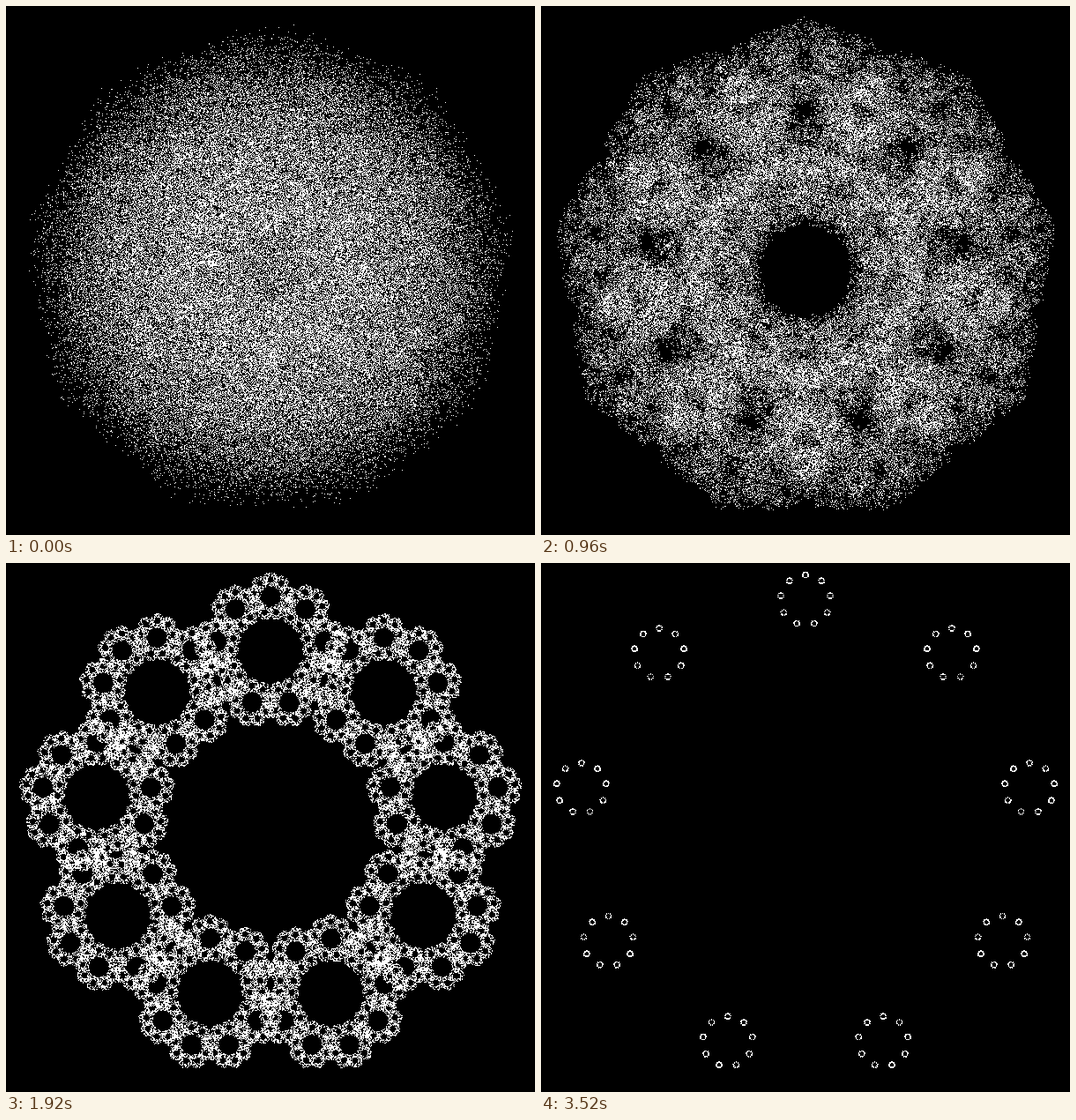
Write an HTML page with a canvas that moves like this. It is 600 px wide and 600 px high and loops after 3600 ms.

```html
<!DOCTYPE html>
<html lang="en">
<head>
<meta charset="utf-8">
<title>Chaos game on a nonagon</title>
<style>
  html, body { margin: 0; width: 100%; height: 100%; overflow: hidden; background: #000; }
  canvas { display: block; width: 600px; height: 600px; image-rendering: pixelated; }
</style>
</head>
<body>
<canvas id="stage" width="600" height="600"></canvas>
<script>
const SIZE = 600, CENTER = SIZE / 2, RADIUS = 290;
const CORNERS = 9, POINTS = 105000, WARM_UP = 30;
const STEP_MS = 80, STEPS = 45;
const BLACK = 0xff000000, WHITE = 0xffffffff;

const ctx = document.getElementById('stage').getContext('2d');
const image = ctx.createImageData(SIZE, SIZE);
const pixels = new Uint32Array(image.data.buffer);

const corners = Array.from({ length: CORNERS }, (_, i) => {
  const angle = i * 2 * Math.PI / CORNERS;
  return { x: CENTER + RADIUS * Math.sin(angle), y: CENTER - RADIUS * Math.cos(angle) };
});

function seededRandom(seed) {
  return () => {
    seed = (seed + 0x6d2b79f5) | 0;
    let t = Math.imul(seed ^ (seed >>> 15), 1 | seed);
    t = (t + Math.imul(t ^ (t >>> 7), 61 | t)) ^ t;
    return ((t ^ (t >>> 14)) >>> 0) / 4294967296;
  };
}

// Each jump keeps `ratio` of the distance to a randomly chosen corner.
function drawStep(step) {
  const ratio = 0.55 - 0.01 * step;
  const random = seededRandom(7919 * (step + 1));
  let x = CENTER, y = CENTER;
  pixels.fill(BLACK);
  for (let i = -WARM_UP; i < POINTS; i++) {
    const corner = corners[Math.floor(random() * CORNERS)];
    x = corner.x + (x - corner.x) * ratio;
    y = corner.y + (y - corner.y) * ratio;
    if (i >= 0) pixels[Math.floor(y) * SIZE + Math.floor(x)] = WHITE;
  }
  ctx.putImageData(image, 0, 0);
}

let shown = -1;
function tick() {
  const step = Math.floor(performance.now() / STEP_MS) % STEPS;
  if (step !== shown) drawStep(shown = step);
  requestAnimationFrame(tick);
}
tick();
</script>
</body>
</html>
```
